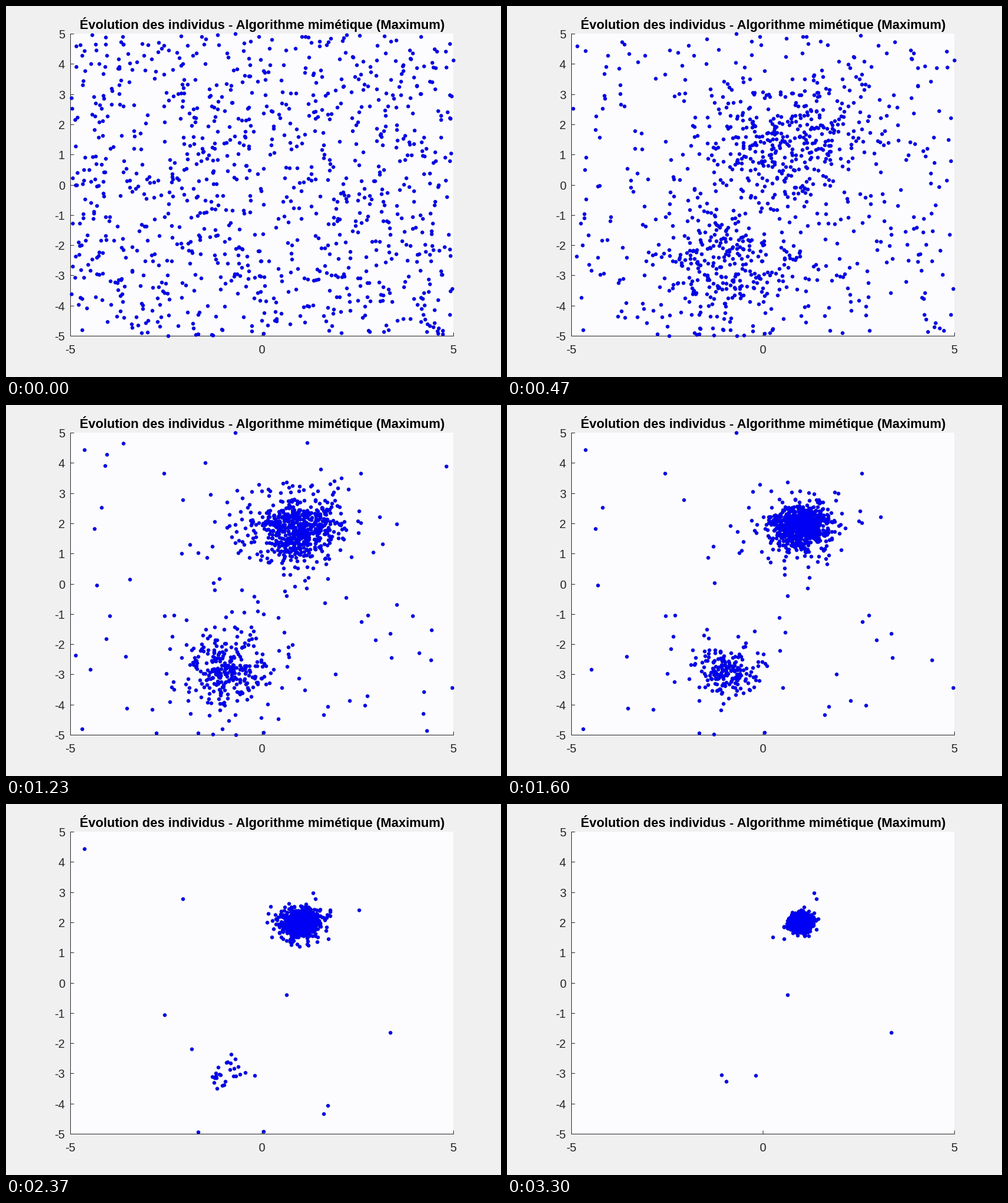
A matplotlib script for the animation above (3.33 s loop, 840 by 630 pixels).

```python
import numpy as np
import matplotlib.pyplot as plt
from matplotlib.animation import FuncAnimation

W, H, DPI = 840, 630, 100
LEFT, RIGHT, TOP, BOTTOM = 109, 759, 47, 560
GENERATIONS, LOOP_MS, COUNT = 100, 3330, 1000
LIFE, MAX_LIFE = 14, 41
INK, FONT = "#262626", "Liberation Sans"
HIGH, LOW = np.array([1.0, 2.0]), np.array([-1.0, -3.0])

# Individuals that are never replaced.
ELDERS = [(0.65, -0.39), (0.26, 1.52), (1.34, 2.98), (1.40, 2.78),
          (-1.08, -3.05), (-0.95, -3.27), (-0.19, -3.07)]


def lifetimes(rng, n):
    """Generations until an individual is replaced."""
    return 1 + rng.exponential(LIFE, n)


def offspring(rng, gen, n):
    """New individuals between the hills at first, then ever closer to a peak."""
    low_share = np.interp(gen, [22, 58], [0.42, 0])
    low = rng.random(n) < low_share
    blend = 0.6 * rng.random(n) ** 2 * np.exp(-gen / 15)
    mix = np.where(low, 1 - blend, blend)[:, None]
    spread = 0.1 + 1.35 * np.exp(-gen / 25)
    pts = HIGH + (LOW - HIGH) * mix + rng.normal(scale=spread, size=(n, 2))
    return np.where(np.abs(pts) > 5, np.sign(pts) * 10 - pts, pts)


def evolve(seed=7):
    rng = np.random.default_rng(seed)
    pos = rng.uniform(-5, 5, (COUNT, 2))
    due = lifetimes(rng, COUNT)
    pos[:len(ELDERS)] = ELDERS
    due[:len(ELDERS)] = np.inf
    history = [pos.copy()]
    for gen in range(1, GENERATIONS):
        hit = np.flatnonzero(due <= gen)
        pos[hit] = offspring(rng, gen, len(hit))
        due[hit] = gen + lifetimes(rng, len(hit)) % MAX_LIFE
        history.append(pos.copy())
    return history


def px(size):
    """Pixels to points."""
    return size * 72 / DPI


fig = plt.figure(figsize=(W / DPI, H / DPI), dpi=DPI, facecolor="#f0f0f0")
ax = fig.add_axes([LEFT / W, 1 - BOTTOM / H, (RIGHT - LEFT) / W, (BOTTOM - TOP) / H],
                  facecolor="#fcfcfe")
ax.set(xlim=(-5, 5), ylim=(-5, 5), xticks=[-5, 0, 5], yticks=range(-5, 6))
ax.tick_params(direction="in", length=px(6), width=px(1), color=INK,
               labelbottom=False, labelleft=False)
for side, spine in ax.spines.items():
    spine.set(visible=side in ("left", "bottom"), color=INK, linewidth=px(1))


def label(x, y, text, size=20, ha="center", **style):
    fig.text(x / W, 1 - y / H, text, fontsize=px(size), family=FONT,
             ha=ha, va="baseline", **style)


label(435, 39, "Évolution des individus - Algorithme mimétique (Maximum)",
      size=22, weight="bold", color="black")
for v in range(-5, 6):
    label(100, BOTTOM - (v + 5) * (BOTTOM - TOP) / 10 + 8, str(v), ha="right", color=INK)
for v in (-5, 0, 5):
    label(LEFT + (v + 5) * (RIGHT - LEFT) / 10, 590, str(v), color=INK)


def dots(size, color, z):
    return ax.plot([], [], "o", ms=px(size), mew=0, color=color,
                   clip_on=False, zorder=z)[0]


# A dark rim under a bright core, so crowds merge into one bright patch.
layers = [dots(6.4, "#0000c0", 5), dots(4.8, "#0000f4", 6)]
history = evolve()


def draw(gen):
    for layer in layers:
        layer.set_data(*history[gen].T)
    return layers


anim = FuncAnimation(fig, draw, frames=GENERATIONS,
                     interval=LOOP_MS / GENERATIONS, repeat=True)
plt.show()
```
